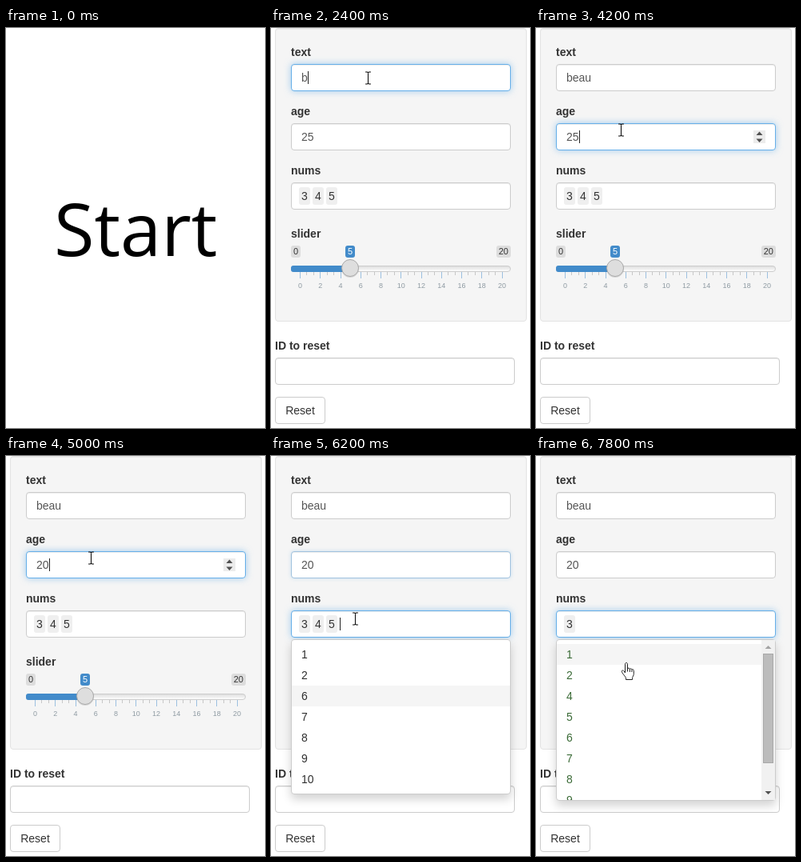
Write an HTML page that moves like this. It is 324 px wide and 500 px high and loops after 8000 ms.

```html
<!DOCTYPE html>
<html lang="en">
<head>
<meta charset="utf-8">
<title>Resetting form inputs</title>
<style>
  html, body { margin: 0; width: 100%; height: 100%; overflow: hidden; background: #fff; }
  #stage { position: relative; width: 324px; height: 500px; overflow: hidden;
    font: 14px/20px "Liberation Sans", Arial, sans-serif; color: #333; }
  #stage * { box-sizing: border-box; }
  #stage .abs, .field, .label, .tag, .handle { position: absolute; }
  #title { left: 0; top: 0; }
  #form, #well, #title { width: 324px; height: 500px; }
  #form { left: 0; top: 0; }
  #stage #well { left: 5px; top: 0; width: 315px; height: 367px; background: #f5f5f5;
    border: 1px solid #e3e3e3; border-radius: 4px; box-shadow: inset 0 1px 1px rgba(0,0,0,.05); }
  .label { font-weight: bold; white-space: nowrap; }
  .field { left: 25px; width: 275px; height: 34px; padding-left: 12px; line-height: 32px;
    color: #555; background: #fff; border: 1px solid #ccc; border-radius: 4px;
    box-shadow: inset 0 1px 1px rgba(0,0,0,.075); }
  .field.focus { border-color: #66afe9;
    box-shadow: inset 0 1px 1px rgba(0,0,0,.075), 0 0 8px rgba(102,175,233,.6); }
  .field.fading { border-color: #a0c2de;
    box-shadow: inset 0 1px 1px rgba(0,0,0,.075), 0 0 5px rgba(102,175,233,.3); }
  .caret { display: inline-block; width: 1px; height: 16px; background: #222; vertical-align: middle; margin-top: -2px; }
  #nums { display: flex; gap: 3px; padding: 5px 9px; color: #333; }
  .token { width: 14px; height: 22px; line-height: 22px; text-align: center;
    background: #efefef; border-radius: 3px; }
  #nums .caret { margin-top: 3px; }
  #spinner { left: 272px; top: 128px; }
  .tag { top: 272px; height: 15px; padding: 0 3px; border-radius: 3px; background: #ddd;
    font-size: 11px; line-height: 15px; }
  #stage .button { left: 5px; top: 461px; width: 63px; padding: 0; text-align: center; color: #333; box-shadow: none; }
  #menu { left: 25px; top: 229px; width: 275px; padding: 5px 0; max-height: 202px; overflow: hidden;
    background: #fff; border: 1px solid #ccc; border-radius: 4px;
    box-shadow: 0 6px 12px rgba(0,0,0,.175); color: #303030; }
  .option { height: 26px; line-height: 26px; padding-left: 12px; }
  .option.active { background: #f5f5f5; }
  #bar { left: 282px; top: 230px; }
  [hidden] { display: none !important; }
</style>
</head>
<body>
<div id="stage">
  <svg id="title" class="abs">
    <text x="60" y="285" font-family="Open Sans, Noto Sans, sans-serif" font-size="92">Start</text>
  </svg>
  <div id="form" class="abs">
    <div id="well" class="abs"></div>
    <div class="label" style="left:25px;top:20px">text</div>
    <div id="text" class="field" style="top:45px"></div>
    <div class="label" style="left:25px;top:94px">age</div>
    <div id="age" class="field" style="top:119px"></div>
    <svg id="spinner" class="abs" width="15" height="16">
      <rect width="15" height="16" fill="#ececec"/>
      <path d="M3.5 6l4-4.5 4 4.5zM3.5 10.5l4 4.5 4-4.5z" fill="#505050"/>
    </svg>
    <div class="label" style="left:25px;top:168px">nums</div>
    <div id="nums" class="field" style="top:193px"></div>

    <div class="label" style="left:25px;top:247px">slider</div>
    <div class="tag" style="left:25px">0</div>
    <div class="tag" style="left:93px;background:#428bca;color:#fff">5</div>
    <div class="tag" style="right:24px">20</div>
    <svg id="slider" class="abs" width="324" height="50" viewBox="0 285 324 50" style="left:0;top:285px">
      <defs>
        <linearGradient id="groove" x2="0" y2="1">
          <stop stop-color="#ddd"/><stop offset="1" stop-color="#fff"/>
        </linearGradient>
      </defs>
      <rect x="25.5" y="297.5" width="274" height="7" rx="3.5" fill="url(#groove)" stroke="#ccc"/>
      <path d="M99 297H28a3 3 0 0 0-3 3v2a3 3 0 0 0 3 3h71z" fill="#428bca"/>
      <g id="ticks" font-size="9" text-anchor="middle" fill="#8f9ba3"></g>
      <circle cx="99" cy="301" r="11" fill="#000" opacity=".12"/>
      <circle cx="99" cy="300" r="10.5" fill="#dedede" stroke="#aaa"/>
    </svg>

    <div class="label" style="left:5px;top:387px">ID to reset</div>
    <div class="field" style="left:5px;top:412px;width:300px"></div>
    <div class="field button">Reset</div>

    <div id="menu" class="abs"></div>
    <svg id="bar" class="abs" width="17" height="200">
      <rect width="17" height="200" fill="#f1f1f1"/>
      <path d="M4.5 11l4-4 4 4z" fill="#a3a3a3"/>
      <path d="M4.5 189l4 4 4-4z" fill="#505050"/>
      <rect id="thumb" x="2.5" y="17.5" width="12" fill="#bcbcbc" stroke="#a8a8a8"/>
    </svg>
    <svg class="abs" width="324" height="500" style="left:0;top:0">
      <g id="pointer">
        <path id="beam" d="M-3.5-7.5h2.5l1 1 1-1h2.5M0-6.5v13M-3.5 7.5h2.5l1-1 1 1h2.5"
          fill="none" stroke="#111" stroke-width="1.1"/>
        <path id="arrow" d="M.5.5v16l3.7-3.5 2.5 5.5 2.4-1-2.5-5.4h5z" fill="#fff" stroke="#111"/>
        <g id="hand">
          <path d="M5.5 13V2.2c0-2.3 3-2.3 3 0V8c.4-1.5 2.6-1.2 2.8.5.5-1.3 2.4-.9 2.6.8.7-1 2.4-.6 2.4 1.2v4c0 2-1.6 3.4-1.8 5v2H6.5v-2c-.9-2.3-3.4-4.2-5-7.3-1-2 1.200-3 2.400-1.500z"
            fill="#fff" stroke="#222"/>
          <path d="M8.500 8v3.500M11.300 8.500v3.500M13.900 9.500v2.500" stroke="#222" fill="none"/>
        </g>
      </g>
    </svg>
  </div>
</div>
<script>
const LOOP = 8000;
const $ = id => document.getElementById(id);
const CARET = '<span class="caret"></span>';

// Each step changes part of the state and holds until the next one.
const steps = [
  [0, { title: true, text: '', age: '25', nums: [3, 4, 5], focus: '', fading: '', caret: false,
        spinner: false, open: false, active: 6, ink: '#303030', pointer: ['beam', 121, 62] }],
  [1000, { title: false }],
  [2400, { text: 'b', focus: 'text', caret: true }],
  [2600, { text: 'bea' }],
  [2800, { text: 'beau' }],
  [3200, { caret: false }],
  [3600, { pointer: ['arrow', 122, 117] }],
  [3800, { pointer: ['beam', 107, 130], caret: true, spinner: true }],
  [4000, { pointer: ['beam', 106, 127] }],
  [4200, { focus: 'age' }],
  [4800, { caret: false }],
  [5000, { age: '20', caret: true }],
  [5600, { pointer: ['arrow', 111, 176] }],
  [5800, { pointer: ['beam', 106, 198] }],
  [6000, { pointer: ['beam', 105, 203] }],
  [6200, { focus: 'nums', fading: 'age', spinner: false, open: true }],
  [6400, { fading: '' }],
  [6800, { nums: [3, 4] }],
  [7000, { nums: [3], ink: '#3b6b37' }],
  [7400, { pointer: ['hand', 100, 246] }],
  [7600, { pointer: ['hand', 100, 263], active: 2, caret: false }],
  [7800, { pointer: ['hand', 106, 258], active: 1 }],
];

function drawTicks() {
  let svg = '';
  for (let i = 0; i <= 30; i++) {
    const x = 36.5 + i * 252.5 / 30, big = i % 3 === 0;
    svg += `<rect x="${Math.round(x - .5)}" y="305" width="1" height="${big ? 8 : 4}" fill="${big ? '#9cc0e0' : '#c7c7c7'}"/>`;
    if (big) svg += `<text x="${x}" y="324.500">${i / 3 * 2}</text>`;
  }
  $('ticks').innerHTML = svg;
}

function render(s) {
  $('title').style.display = s.title ? '' : 'none';
  $('form').hidden = s.title;

  const caretIn = id => s.caret && s.focus === id ? CARET : '';
  for (const id of ['text', 'age', 'nums']) {
    $(id).classList.toggle('focus', s.focus === id);
    $(id).classList.toggle('fading', s.fading === id);
  }
  $('text').innerHTML = s.text + caretIn('text');
  $('age').innerHTML = s.age + caretIn('age');
  $('nums').innerHTML = s.nums.map(n => `<span class="token">${n}</span>`).join('') + caretIn('nums');
  $('spinner').style.display = s.spinner ? '' : 'none';

  const options = Array.from({ length: 10 }, (_, i) => i + 1).filter(n => !s.nums.includes(n));
  const content = options.length * 26 + 10;
  $('menu').hidden = !s.open;
  $('menu').style.color = s.ink;
  $('menu').innerHTML = options.map(n =>
    `<div class="option${n === s.active ? ' active' : ''}">${n}</div>`).join('');
  $('bar').style.display = s.open && content > 200 ? '' : 'none';
  $('thumb').setAttribute('height', Math.round(166 * 200 / content));

  const [kind, x, y] = s.pointer;
  for (const id of ['beam', 'arrow', 'hand']) $(id).style.display = id === kind ? '' : 'none';
  const offset = kind === 'beam' ? .5 : 0;
  $('pointer').setAttribute('transform', `translate(${x + offset} ${y + offset})`);
}

let shown = -1;
function tick() {
  const time = performance.now() % LOOP;
  const count = steps.filter(([at]) => at <= time).length;
  if (count !== shown) {
    shown = count;
    render(Object.assign({}, ...steps.slice(0, count).map(step => step[1])));
  }
  requestAnimationFrame(tick);
}

drawTicks();
tick();
</script>
</body>
</html>
```
